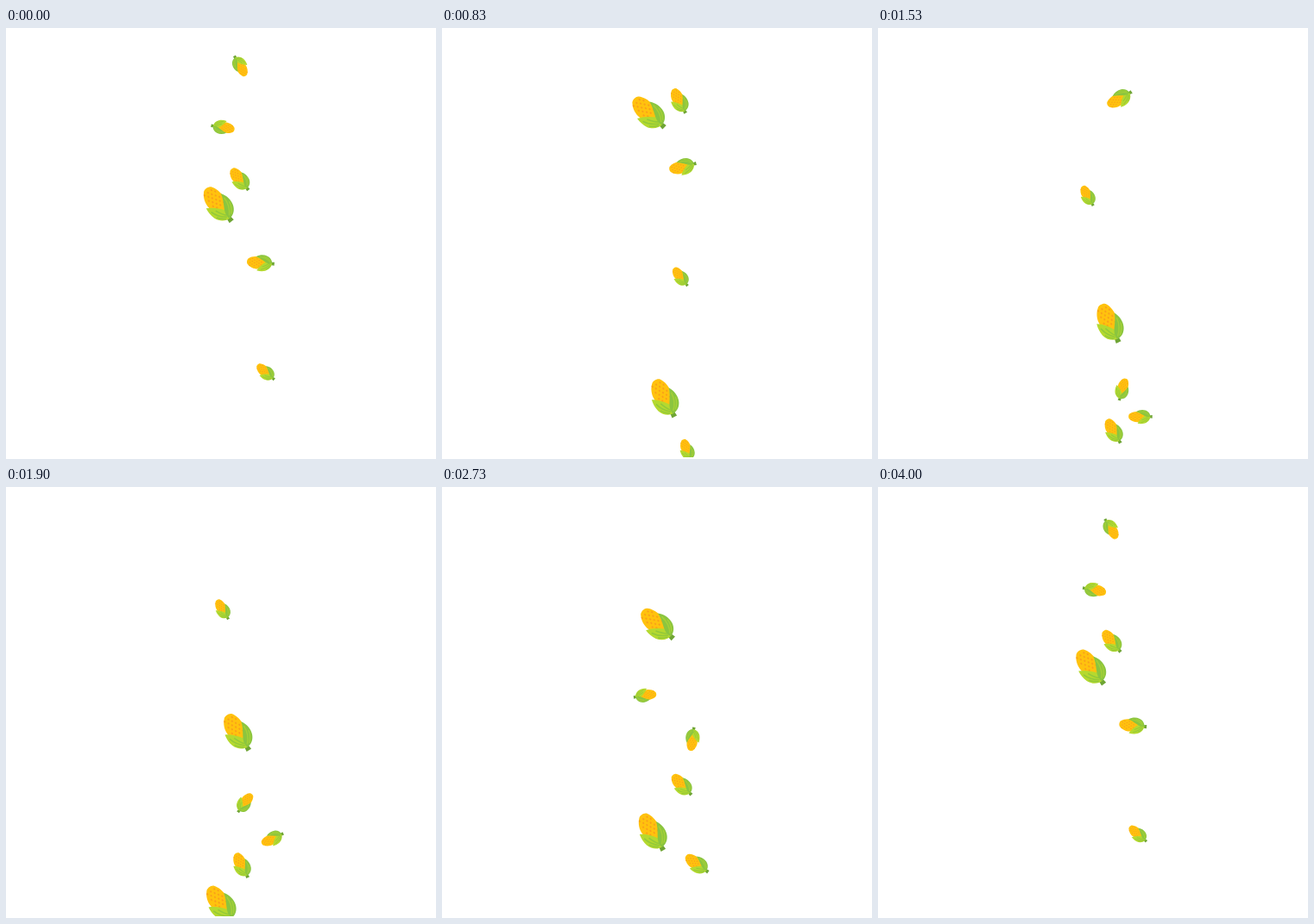
Write an HTML page with a canvas that moves like this. It is 498 by 500 pixels and loops after 4030 ms.

```html
<!DOCTYPE html>
<html lang="en">
<head>
<meta charset="utf-8">
<title>Rising corn</title>
<style>
  html, body { margin: 0; width: 100%; height: 100%; overflow: hidden; background: #fff; }
  canvas { display: block; }
</style>
</head>
<body>
<canvas id="stage" width="498" height="498"></canvas>
<script>
const ctx = document.getElementById('stage').getContext('2d');
const LOOP = 4030, LIFE = 3500;

// Shared key times; each cob starts at its own index and may run past the loop end.
const TIMES = [830, 1530, 2270, 2730, 3370, 4030, 4860, 5560, 6300];

// keys: [x, y, direction of the tip in degrees]
const cobs = [
  { size: 1, born: 290, first: 0, keys: [
    [258, 430, -118], [268.5, 343, -115], [265, 225.5, -131], [250, 160, -138], [256, 81, -136]] },
  { size: 1, born: 1850, first: 2, keys: [
    [247, 447, -124], [244, 401, -121], [260, 310, -122], [246.5, 205.5, -128], [240, 99, -137]] },
  { size: .65, born: 1390, first: 1, keys: [
    [273, 468, -120], [274, 407, -116], [278, 346, -134], [275, 257.5, -144], [271, 176, -129], [275, 85, -117]] },
  { size: .66, born: 2250, first: 2, keys: [
    [297, 479, -135], [295.5, 437.5, -144], [296, 370, -156], [295, 272.5, -175], [279, 161, -194], [280, 82, -210]] },
  { size: .55, born: 700, first: 0, keys: [
    [284, 490, -112], [283, 419.5, -74], [265, 310, -33], [235, 242, -9], [241, 143, 28], [271, 44, 60]] },
  { size: .57, born: 1130, first: 1, keys: [
    [304, 451, 180], [310, 362.5, 129], [290, 292.5, 98], [241, 208, 52], [251, 115.5, 9]] },
  { size: .54, born: 3160, first: 4, keys: [
    [291, 461, -129], [301, 399.5, -139], [276.5, 289, -128], [243, 195, -119], [266, 89, -124]] }
];

// Smooth curve through the keys, continued in a straight line at both ends.
function pose({ keys, first }, t) {
  const last = keys.length - 1, time = i => TIMES[first + i];
  const axis = k => {
    const secant = (a, b) => (keys[b][k] - keys[a][k]) / (time(b) - time(a));
    const slope = i => secant(Math.max(i - 1, 0), Math.min(i + 1, last));
    if (t <= time(0)) return keys[0][k] + slope(0) * (t - time(0));
    if (t >= time(last)) return keys[last][k] + slope(last) * (t - time(last));
    let i = 0;
    while (t > time(i + 1)) i++;
    const span = time(i + 1) - time(i), u = (t - time(i)) / span, v = 1 - u;
    return v * v * (1 + 2 * u) * keys[i][k] + u * u * (3 - 2 * u) * keys[i + 1][k]
      + span * u * v * (v * slope(i) - u * slope(i + 1));
  };
  return [axis(0), axis(1), axis(2)];
}

const ear = new Path2D('M-5-22C-3-25 4-25 6-22C9-18 11-11 10-4L5 14H-6L-11-4C-12-11-9-18-5-22Z');
const lightLeaf = new Path2D('M-14-6C-8-3-2 3 2 9L7 12L1 20C-5 20-11 16-13.5 9C-15 4-15-1-14-6Z');
const darkLeaf = new Path2D('M10-9C14-3 15 4 13 10C11 16 6 20 0 20C-1 15 0 11 3 6C6 1 9-4 10-9Z');
const lightVeins = new Path2D('M-12 1C-10 8-6 13-1 17M-7 3C-5 8-3 12 0 15M-11 10C-9 14-6 16-3 18');
const darkVeins = new Path2D('M10-3C10 5 7 12 2 17M12 4C11 10 8 14 5 17');
const stem = new Path2D('M-2.5 18H2.5L3.2 24H-3.2Z');

function fill(path, color) {
  ctx.fillStyle = color;
  ctx.fill(path);
}

function stroke(path, color) {
  ctx.strokeStyle = color;
  ctx.lineWidth = 1.5;
  ctx.stroke(path);
}

function drawCob(x, y, angle, size) {
  ctx.save();
  ctx.translate(x, y);
  ctx.rotate((angle + 90) * Math.PI / 180);
  ctx.scale(size, size);
  fill(stem, '#6fa535');
  fill(ear, '#ffc20e');
  ctx.fillStyle = '#f9a01b';
  for (let row = 0; row < 6; row++) {
    for (let col = -1; col < 2; col++) {
      ctx.fillRect(col * 5 + (row % 2 ? 1.3 : -1.2) - .8, row * 4 - 20, 1.7, 2.2);
    }
  }
  fill(lightLeaf, '#b5d92f');
  stroke(lightVeins, '#93c93a');
  fill(darkLeaf, '#8bc53f');
  stroke(darkVeins, '#a5d037');
  ctx.restore();
}

function frame(now) {
  const t = now % LOOP;
  ctx.clearRect(0, 0, 498, 498);
  for (const cob of cobs) {
    for (const time of [t, t + LOOP]) {
      if (time >= cob.born && time < cob.born + LIFE) drawCob(...pose(cob, time), cob.size);
    }
  }
  requestAnimationFrame(frame);
}

frame(0);
</script>
</body>
</html>
```
